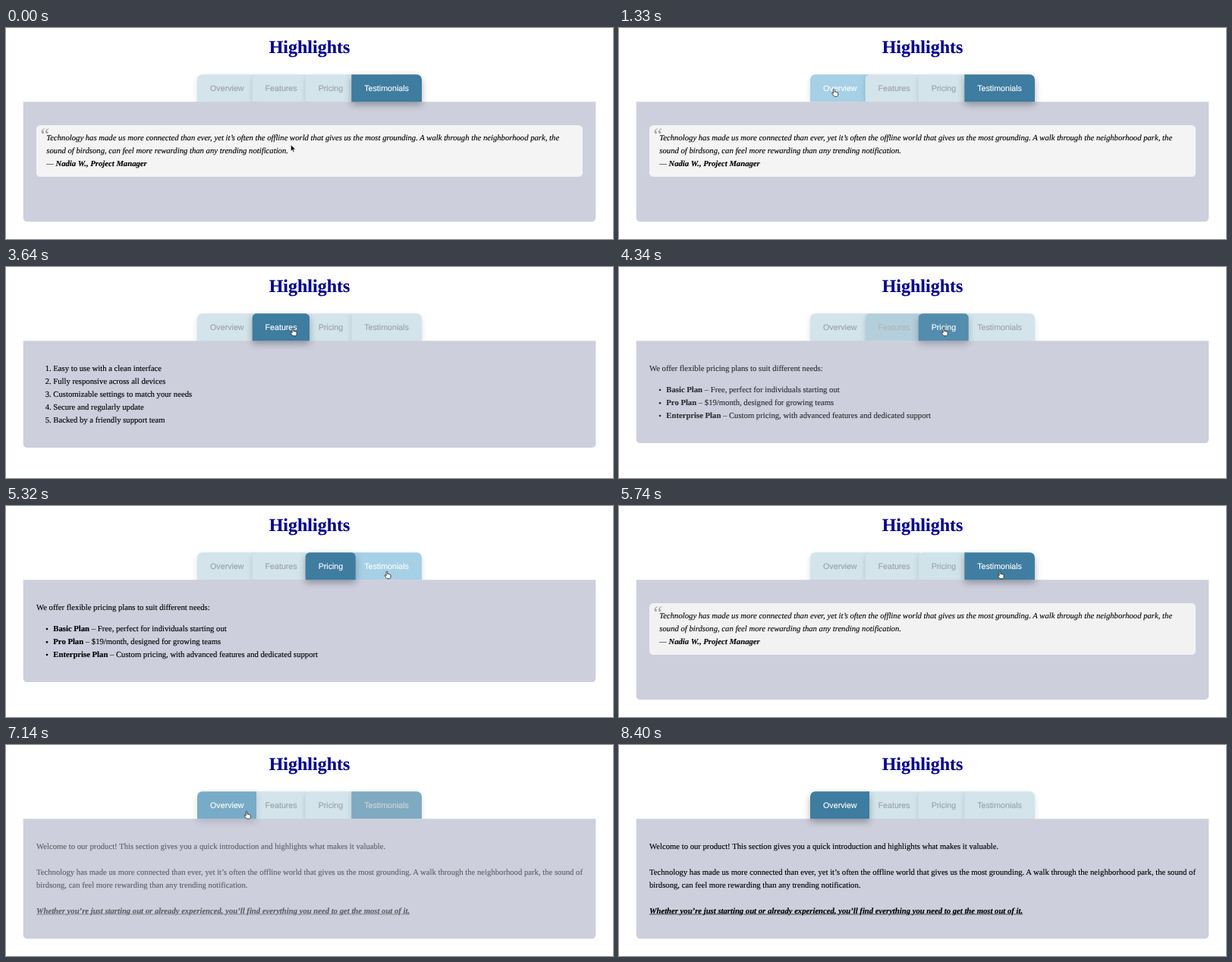
Animation, 800 px wide and 278 px high, one loop 8.75 s. Source, as an HTML page:

```html
<!DOCTYPE html>
<html lang="en">
<head>
<meta charset="utf-8">
<title>Highlights</title>
<style>
  html, body { margin: 0; width: 800px; height: 278px; overflow: hidden; background: #fff; }
  #page {
    position: absolute; left: 0; top: 0; width: 1200px; height: 417px;
    transform: scale(.666667); transform-origin: 0 0;
    font: 16px/1.6 "Liberation Serif", "Times New Roman", serif; color: #000;
    text-rendering: geometricPrecision; white-space: nowrap;
    -webkit-text-stroke: .2px;
  }
  h1 {
    position: absolute; top: 17px; width: 100%; margin: 0;
    font-size: 36px; line-height: 40px; text-align: center; color: #00008b;
  }
  #tabs { position: absolute; top: 92px; width: 100%; display: flex; justify-content: center; }
  .tab {
    position: relative; padding: 0 25px; height: 53.5px; border-radius: 8px 8px 0 0;
    font: 16px/55px "Liberation Sans", Arial, sans-serif;
  }
  .tab + .tab { margin-left: -8px; }
  .tab:first-child { padding-left: 26px; border-radius: 10px 0 0 0; }
  .tab:last-child { padding-right: 26px; border-radius: 0 10px 0 0; }
  #panel {
    position: absolute; z-index: 2; left: 34px; top: 145.5px; width: 1132px;
    box-sizing: border-box; padding: 27px 26px 25px; background: #cdcfdd; border-radius: 0 0 8px 8px;
  }
  .content { display: none; }
  p, ol, ul { margin: 16px 0; }
  ol, ul { padding-left: 33.5px; }
  .quote { height: 185.6px; }
  blockquote {
    position: relative; top: 19px; margin: 0; padding: 13px 20px;
    background: #f4f4f4; border-radius: 8px; font-style: italic;
  }
  blockquote::before {
    content: "\201C"; position: absolute; left: 4px; top: 0;
    font-size: 40px; line-height: 1; color: #a6a6a6;
  }
  #cursor { position: absolute; left: 0; top: 0; width: 9px; height: 11px; overflow: visible; }
</style>
</head>
<body>
<div id="page">
  <h1>Highlights</h1>
  <div id="tabs">
    <div class="tab">Overview</div>
    <div class="tab">Features</div>
    <div class="tab">Pricing</div>
    <div class="tab">Testimonials</div>
  </div>
  <div id="panel">
    <div class="content">
      <p>Welcome to our product! This section gives you a quick introduction and highlights what makes it valuable.<br><br>
      Technology has made us more connected than ever, yet it’s often the offline world that gives us the most grounding. A walk through the neighborhood park, the sound of<br>
      birdsong, can feel more rewarding than any trending notification.<br><br>
      <b><i><u>Whether you’re just starting out or already experienced, you’ll find everything you need to get the most out of it.</u></i></b></p>
    </div>
    <div class="content">
      <ol>
        <li>Easy to use with a clean interface</li>
        <li>Fully responsive across all devices</li>
        <li>Customizable settings to match your needs</li>
        <li>Secure and regularly update</li>
        <li>Backed by a friendly support team</li>
      </ol>
    </div>
    <div class="content">
      <p>We offer flexible pricing plans to suit different needs:</p>
      <ul>
        <li><b>Basic Plan</b> – Free, perfect for individuals starting out</li>
        <li><b>Pro Plan</b> – $19/month, designed for growing teams</li>
        <li><b>Enterprise Plan</b> – Custom pricing, with advanced features and dedicated support</li>
      </ul>
    </div>
    <div class="content quote">
      <blockquote>Technology has made us more connected than ever, yet it’s often the offline world that gives us the most grounding. A walk through the neighborhood park, the<br>
      sound of birdsong, can feel more rewarding than any trending notification.<br>
      — <b>Nadia W., Project Manager</b></blockquote>
    </div>
  </div>
</div>
<svg id="cursor" viewBox="0 0 18 22">
  <path id="arrow" d="M1 1v16.5l3.8-3.6 2.6 6 2.6-1.1-2.6-5.9h5.2z" fill="#000" stroke="#fff"/>
  <path id="hand" d="M5 13V3.2a1.8 1.8 0 0 1 3.6 0V9l1.2-.6a1.6 1.6 0 0 1 2 1l1.5-.2a1.5 1.5 0 0 1 1.6 1.2l1 .1a1.4 1.4 0 0 1 1.2 1.4v3.6c0 2.8-1.5 5.5-3 5.5H8.5C6 21 4.6 17.5 1.4 13.4c-1-1.6.8-3 2-2z"
    fill="#fff" stroke="#111" stroke-width="1.5"/>
</svg>
<script>
const LOOP = 8750, STEP = 70, FADE = 400, BLEND = 300, SAMPLES = 24;

// [time, tab opened]
const clicks = [[0, 3], [1750, 0], [2940, 1], [4130, 2], [5460, 3], [7000, 0]];

// [start, end, x, y]: the pointer eases to x, y between start and end
const moves = [
  [0, 0, 375.5, 154],
  [420, 1290, 283.5, 80.5],
  [2240, 2455, 378, 81],
  [3640, 4080, 428, 81],
  [4690, 5320, 502, 86],
  [6090, 6580, 312, 82],
  [6580, 6930, 316.5, 84.5],
  [7100, 7630, 353, 270],
  [7840, 7900, 355, 290]
];

const looks = {
  idle: { back: [211, 228, 235], text: [156, 161, 168] },
  hover: { back: [166, 208, 230], text: [255, 255, 255] },
  active: { back: [62, 124, 160], text: [255, 255, 255] }
};

const byId = id => document.getElementById(id);
const tabs = [...document.querySelectorAll(".tab")];
const contents = [...document.querySelectorAll(".content")];
const cursor = byId("cursor"), arrow = byId("arrow"), hand = byId("hand");
const edges = [251.5, 324.5, 394.5, 455, 548.7];

const clamp = v => Math.min(1, Math.max(0, v));
const ease = u => u * u * (3 - 2 * u);
const lastClick = t => clicks.filter(c => c[0] <= t).pop();

function pointer(t) {
  let [, , x, y] = moves[0];
  for (const [start, end, toX, toY] of moves.slice(1)) {
    if (t < start) break;
    const k = ease(clamp((t - start) / (end - start)));
    x += (toX - x) * k;
    y += (toY - y) * k;
  }
  return { x, y };
}

function hoveredTab({ x, y }) {
  if (y < 62 || y >= 97) return -1;
  return edges.findIndex((left, i) => x >= left && x < edges[i + 1]);
}

// Share of each look over the recent past, which gives smooth colour transitions.
function tabWeights(t) {
  const weights = tabs.map(() => ({ idle: 0, hover: 0, active: 0 }));
  for (let k = 0; k < SAMPLES; k++) {
    const p = (k + .5) / SAMPLES;
    const past = Math.max(0, t - p * BLEND);
    const open = lastClick(past)[1], over = hoveredTab(pointer(past));
    weights.forEach((w, i) => {
      const look = i === open ? "active" : i === over ? "hover" : "idle";
      w[look] += 6 * p * (1 - p) / SAMPLES;
    });
  }
  return weights;
}

function blend(weights, part) {
  const total = weights.idle + weights.hover + weights.active;
  const mixed = [0, 1, 2].map(c =>
    Object.keys(looks).reduce((sum, name) => sum + weights[name] * looks[name][part][c], 0) / total);
  return `rgb(${mixed.map(Math.round)})`;
}

function draw(t) {
  const [since, open] = lastClick(t);
  tabWeights(t).forEach((w, i) => {
    const style = tabs[i].style;
    style.background = blend(w, "back");
    style.color = blend(w, "text");
    style.zIndex = i === open ? 3 : 1;
    style.boxShadow = i === open
      ? `0 6px 15px rgba(0,0,0,${.3 * w.active})`
      : "0 4px 11px rgba(0,0,0,.14)";
  });
  contents.forEach((content, i) => {
    content.style.display = i === open ? "block" : "none";
    content.style.opacity = since ? ease(clamp((t - since + STEP) / FADE)) : 1;
  });

  const at = pointer(t), onTab = hoveredTab(at) >= 0;
  const [hotX, hotY] = onTab ? [3.4, .7] : [.5, .5];
  arrow.style.display = onTab ? "none" : "inline";
  hand.style.display = onTab ? "inline" : "none";
  cursor.style.transform = `translate(${at.x - hotX}px, ${at.y - hotY}px)`;
  cursor.style.visibility = at.y > 278 ? "hidden" : "visible";
}

const began = performance.now();
function tick() {
  const t = (performance.now() - began) % LOOP;
  draw(Math.floor(t / STEP) * STEP);
  requestAnimationFrame(tick);
}
tick();
</script>
</body>
</html>
```
